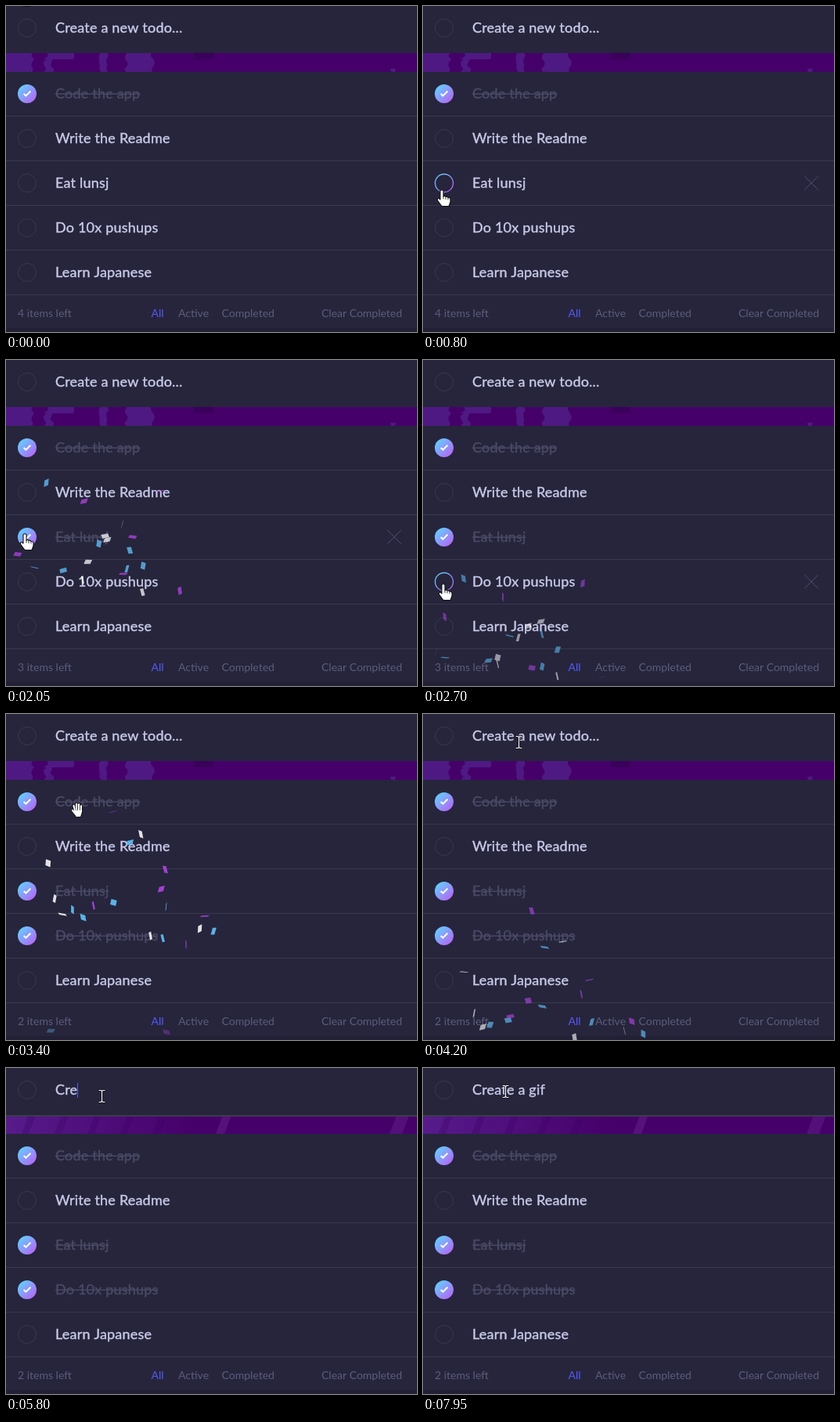
Animation of 525 by 416 pixels, one loop 8000 ms. Source, as an HTML page with a canvas:

```html
<!DOCTYPE html>
<html lang="en">
<head>
<meta charset="utf-8">
<title>Todo list</title>
<style>
html, body { margin: 0; width: 100%; height: 100%; overflow: hidden; background: #26253c; }
canvas { display: block; }
</style>
</head>
<body>
<canvas id="stage" width="525" height="416"></canvas>
<script>
const ctx = document.getElementById('stage').getContext('2d');
const LOOP = 8000, STEP = 50, TICK = 1000 / 60;
const CARD = '#26253c', LINE = '#39394d', TEXT = '#c8cae8', DIM = '#4a4a66', FOOT = '#5b5d7c', ACCENT = '#5659fb';
const BAND = '#46006a', BAND_LIGHT = '#4f1984', BAND_DEEP = '#3b005b';
const CONFETTI = ['#66c8ff', '#b545e8', '#ffffff'];
const BIG = '18px Lato, "Open Sans", sans-serif';
const SMALL = '14px Lato, "Open Sans", sans-serif';

const CHECK_A = 1150, CHECK_B = 2950, FOCUS = 4400, BLUR = 7900;
const rows = [
  ['Code the app', 0], ['Write the Readme', Infinity], ['Eat lunsj', CHECK_A],
  ['Do 10x pushups', CHECK_B], ['Learn Japanese', Infinity]
].map(([label, doneAt], i) => ({ label, doneAt, y: 112 + 57 * i }));

const typed = 'Create a gif';
const keyTimes = [5350, 5550, 5800, 6300, 6500, 6700, 6850, 7000, 7050, 7200, 7300, 7450];

// moves of the mouse: start, end, target x, target y
const home = { x: 22, y: -20 };
const moves = [
  [200, 650, 27, 305], [650, 850, 24, 222], [2050, 2450, 26, 286],
  [3050, 3400, 90, 114], [3400, 3800, 122, 36], [7800, 7900, 105, 30]
];

function randomFrom(seed) {
  return () => (seed = (seed * 16807) % 2147483647) / 2147483647;
}

function burst(start, y, seed) {
  const rnd = randomFrom(seed);
  return Array.from({ length: 20 }, (_, i) => {
    const angle = (18 + 77 * rnd()) * Math.PI / 180, speed = 12 + 17 * rnd();
    return {
      start, y, x: 27, color: CONFETTI[i % 3],
      vx: speed * Math.cos(angle), vy: -speed * Math.sin(angle),
      phase: rnd() * 10, rate: Math.min(0.11, 0.05 + rnd() * 0.1), tilt: rnd() * Math.PI
    };
  });
}
const confetti = [...burst(CHECK_A, 226, 52361), ...burst(CHECK_B, 283, 918273)];

// launch speed decays by a tenth each tick, gravity is a steady fall
function drawConfetti(t) {
  for (const p of confetti) {
    const n = (t - p.start) / TICK;
    if (n <= 0 || n >= 200) continue;
    const reach = 10 * (1 - Math.pow(0.9, n));
    const x = p.x + p.vx * reach, y = p.y + p.vy * reach + 3 * n;
    const w = p.phase + p.rate * n, a = p.tilt + 0.1 * n;
    const wx = x + 10 * Math.cos(w), wy = y + 10 * Math.sin(w);
    const tx = 2.5 * Math.cos(a), ty = 2.5 * Math.sin(a);
    ctx.globalAlpha = 1 - n / 200;
    poly(p.color, [x, y, wx, y + ty, wx + tx, wy + ty, x + tx, wy]);
  }
  ctx.globalAlpha = 1;
}

function poly(color, pts) {
  ctx.fillStyle = color;
  ctx.beginPath();
  for (let i = 0; i < pts.length; i += 2) ctx.lineTo(pts[i], pts[i + 1]);
  ctx.fill();
}

function rect(color, x, y, w, h) {
  ctx.fillStyle = color;
  ctx.fillRect(x, y, w, h);
}

function stroke(color, width, path) {
  ctx.strokeStyle = color;
  ctx.lineWidth = width;
  ctx.stroke(new Path2D(path));
}

function bigText(str, y, color) {
  ctx.font = BIG;
  ctx.letterSpacing = '0.2px';
  ctx.fillStyle = ctx.strokeStyle = color;
  ctx.lineWidth = 0.4;
  ctx.fillText(str, 63, y);
  ctx.strokeText(str, 63, y);
  return ctx.measureText(str).width;
}

function smallText(str, x, color) {
  ctx.font = SMALL;
  ctx.letterSpacing = '0px';
  ctx.fillStyle = color;
  ctx.fillText(str, x, 396.5);
}

function blend(y) {
  const g = ctx.createLinearGradient(15, y - 12, 39, y + 12);
  g.addColorStop(0, '#57ddff');
  g.addColorStop(1, '#c058f3');
  return g;
}

function ring(y, done, hot) {
  ctx.beginPath();
  ctx.arc(27, y, done ? 12 : 11.5, 0, Math.PI * 2);
  if (done) {
    ctx.fillStyle = blend(y);
    ctx.fill();
    stroke('#fff', 2, `M22.7 ${y}l2.7 2.7l6 -6`);
  } else {
    ctx.strokeStyle = hot ? blend(y) : LINE;
    ctx.lineWidth = hot ? 1.3 : 1;
    ctx.stroke();
  }
}

// ragged patch of the banner between two x positions
function patch(color, left, right, top, bottom, rnd) {
  const pts = [];
  for (let y = top; y <= bottom; y += 4) pts.push(left + 6 * rnd(), y);
  for (let y = bottom; y >= top; y -= 4) pts.push(right - 6 * rnd(), y);
  poly(color, pts);
}

function drawBand(focused) {
  rect(BAND, 0, 60, 525, 24);
  if (focused) {
    const g = ctx.createLinearGradient(0, 0, 240, 0);
    g.addColorStop(0, '#571b8b');
    g.addColorStop(1, BAND);
    rect(g, 0, 60, 240, 24);
    const streak = (color, x, w) => poly(color, [x, 84, x + 9, 60, x + w + 9, 60, x + w, 84]);
    for (let x = 20; x < 200; x += 42) streak('rgba(58,0,98,.3)', x, 9);
    streak('#57107c', 268, 11);
    streak('#550f7b', 490, 16);
    rect('#3b3b49', 0, 60, 525, 2);
  } else {
    const rnd = randomFrom(4242);
    patch(BAND_LIGHT, -6, 38, 60, 84, rnd);
    patch(BAND_LIGHT, 48, 90, 60, 68, rnd);
    patch(BAND_LIGHT, 46, 62, 68, 84, rnd);
    patch(BAND_LIGHT, 117, 134, 60, 84, rnd);
    patch(BAND_LIGHT, 150, 190, 60, 84, rnd);
    patch(BAND_DEEP, 235, 266, 60, 68, rnd);
    patch(BAND_LIGHT, 489, 503, 80, 84, rnd);
  }
}

function mouseAt(t) {
  let { x, y } = home;
  for (const [start, end, tx, ty] of moves) {
    const k = Math.min(1, Math.max(0, (t - start) / (end - start)));
    const e = k * k * (3 - 2 * k);
    x += (tx - x) * e;
    y += (ty - y) * e;
  }
  return { x, y };
}

function drawCursor(m) {
  ctx.save();
  ctx.translate(Math.round(m.x), Math.round(m.y));
  ctx.lineJoin = ctx.lineCap = 'round';
  if (m.x > 40 && m.y < 60) {
    const beam = 'M-3 -7.5H-1L.5 -6.5L2 -7.5H4M.5 -6.5V6.5M-3 7.5H-1L.5 6.5L2 7.5H4';
    stroke('#15151f', 2.6, beam);
    stroke('#fff', 1.1, beam);
  } else if (m.x > 40) {
    ctx.translate(1, 8);
    const fingers = 'M-4.5 -5L-2.5 2M-1 -7V2M2 -6.5V2M5 -4.5L4.5 2M-6 1L-2 6';
    const palm = 'M-4 2L-2 7V9H4L6 3V0H-2Z';
    stroke('#111', 4.4, fingers);
    stroke('#111', 2, palm);
    stroke('#fff', 2.3, fingers);
    ctx.fillStyle = '#fff';
    ctx.fill(new Path2D(palm));
    stroke('#222', 0.6, 'M-2.5 -3L-1.5 1M.5 -4V1M3.4 -3.5V1');
  } else {
    const hand = 'M-2 1Q0 -1.5 2 1V8Q4 6.5 5 8.5Q7 7.5 8 9.5Q11 9 11 12V15L9 20.5H0L-5.5 13Q-6 9.5 -3 11L-2 12Z';
    ctx.fillStyle = '#fff';
    ctx.fill(new Path2D(hand));
    stroke('#111', 1.1, hand);
    stroke('#222', 0.9, 'M2 8V11M5 8.5V11.5M8 9.5V12');
  }
  ctx.restore();
}

function drawInput(t) {
  ring(28, false, false);
  const count = keyTimes.filter(k => t >= k).length;
  const width = bigText(count ? typed.slice(0, count) : 'Create a new todo...', 34, TEXT);
  if (t >= FOCUS && t < BLUR) rect(ACCENT, 63 + Math.round(count ? width : 0), 19, 1, 19);
}

function drawRow(row, t, m) {
  const done = t >= row.doneAt;
  const off = Math.abs(m.y - row.y), hover = m.x < 40 && off < 28;
  rect(LINE, 0, row.y + 28, 525, 1);
  ring(row.y, done, hover && off < 13);
  const width = bigText(row.label, row.y + 6, done ? DIM : TEXT);
  if (done) rect(DIM, 63, row.y - 0.5, width, 1.4);
  if (hover) stroke('#4e5070', 1, `M487.2 ${row.y - 9}l17.6 17.6m0 -17.6l-17.6 17.6`);
}

function draw(t) {
  const m = mouseAt(t);
  rect(CARD, 0, 0, 525, 416);
  drawBand(t >= FOCUS);
  drawInput(t);
  rows.forEach(r => drawRow(r, t, m));
  const left = 5 - rows.filter(r => t >= r.doneAt).length;
  smallText(left + ' items left', 15, FOOT);
  smallText('All', 185.5, ACCENT);
  smallText('Active', 220, FOOT);
  smallText('Completed', 275.5, FOOT);
  smallText('Clear Completed', 403, FOOT);
  rect('#212035', 0, 411, 525, 5);
  drawConfetti(t);
  drawCursor(m);
}

const begin = performance.now();
function frame() {
  const t = (performance.now() - begin) % LOOP;
  draw(Math.floor(t / STEP) * STEP);
  requestAnimationFrame(frame);
}
frame();
</script>
</body>
</html>
```
